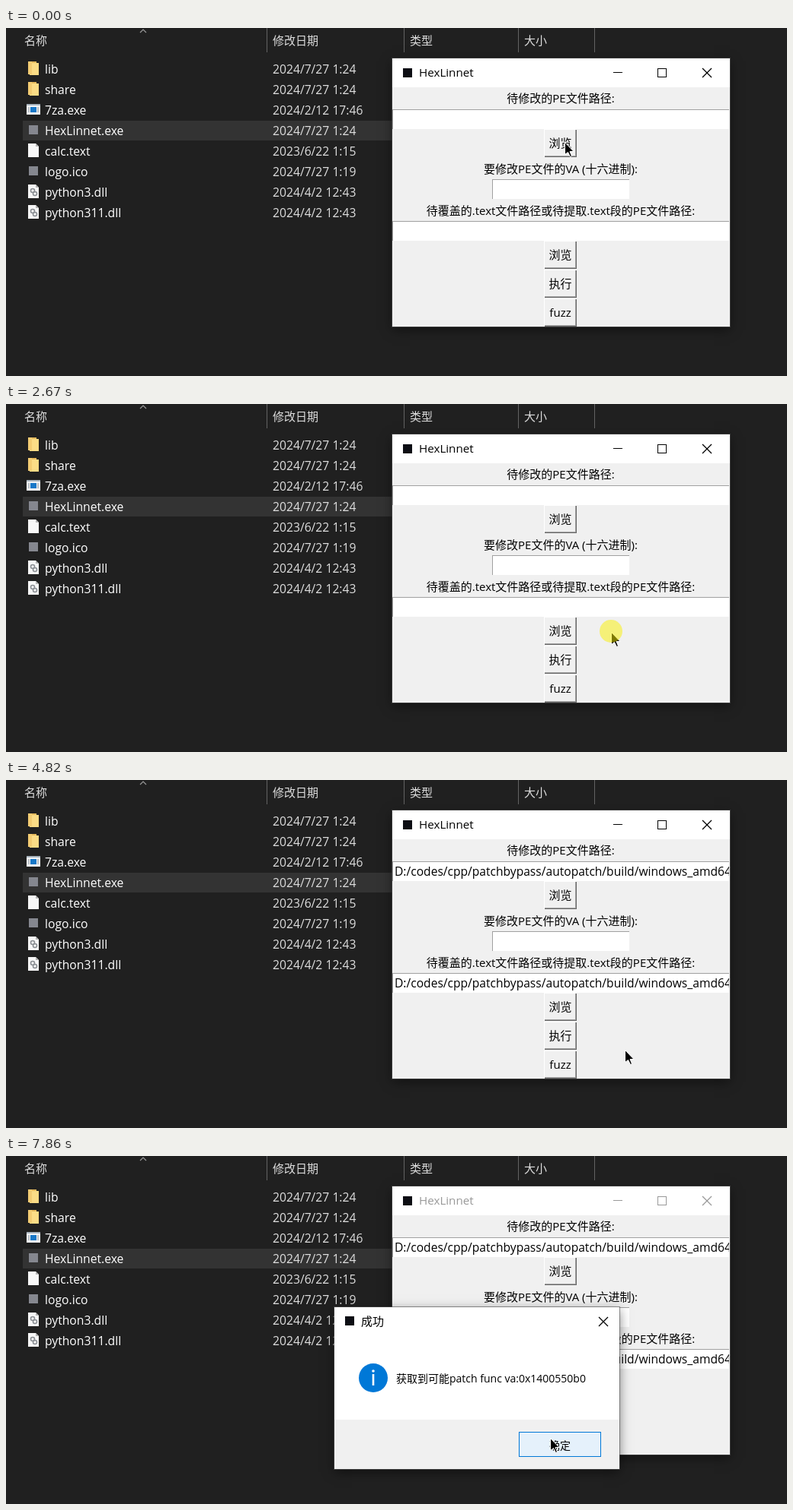
These frames come from a looping animation (1025x458 px, 8000 ms). An HTML page with a canvas:

```html
<!DOCTYPE html>
<html lang="zh-CN">
<head>
<meta charset="utf-8">
<title>HexLinnet</title>
<style>
html, body { margin: 0; width: 100%; height: 100%; overflow: hidden; background: #202020; }
canvas { display: block; }
</style>
</head>
<body>
<canvas id="stage" width="1025" height="458"></canvas>
<script>
const ctx = document.getElementById('stage').getContext('2d');
const LOOP = 8000, APP = 'HexLinnet';
const PATH = 'D:/codes/cpp/patchbypass/autopatch/build/windows_amd64/' + APP + '.exe';
const FILES = [
  ['lib', '2024/7/27 1:24', 'folder'],
  ['share', '2024/7/27 1:24', 'folder'],
  ['7za.exe', '2024/2/12 17:46', 'exe'],
  [APP + '.exe', '2024/7/27 1:24', 'logo'],
  ['calc.text', '2023/6/22 1:15', 'page'],
  ['logo.ico', '2024/7/27 1:19', 'logo'],
  ['python3.dll', '2024/4/2 12:43', 'dll'],
  ['python311.dll', '2024/4/2 12:43', 'dll'],
];
const PLACES = ['此电脑', '3D 对象', '视频', '图片', '文档', '下载', '音乐', '桌面', '本地磁盘 (C:)'];

// Pointer path: time, x, y
const POINTER = [
  [0, 733, 150], [70, 733, 150], [480, 722, 151], [670, 721, 151], [800, 712, 140], [1059, 712, 140],
  [1060, 721, 152], [1590, 721, 152], [2000, 790, 286], [2270, 794, 300], [2740, 794, 300],
  [3210, 729, 297], [3889, 729, 297], [3890, 819, 362], [3950, 819, 362], [4090, 821, 357], [4750, 821, 357],
  [5130, 727, 336], [5840, 727, 336], [6050, 706, 373], [7119, 706, 373], [7120, 717, 375],
  [7580, 717, 375], [7800, 714, 371], [8000, 714, 371],
];
const CLICKS = [[530, 680], [2470, 2540], [2600, 2740], [3280, 3420], [4350, 4490], [5120, 5260], [6190, 6330]];

const within = (t, a, b) => t >= a && t < b;
const fade = (t, on, off) => Math.max(0, Math.min(1, (t - on) / 60, (off - t) / 100));

function rect(x, y, w, h, color) {
  ctx.fillStyle = color;
  ctx.fillRect(x, y, w, h);
}

function text(str, x, y, color = '#fff', size = 15, align = 'left') {
  ctx.font = `${size}px "Open Sans", "Noto Sans CJK SC", "Noto Sans CJK", sans-serif`;
  ctx.textAlign = align;
  ctx.fillStyle = color;
  ctx.fillText(str, x, y + 5.5);
}

function line(color, width, ...points) {
  ctx.strokeStyle = color;
  ctx.lineWidth = width;
  ctx.beginPath();
  for (let i = 0; i < points.length; i += 2) ctx.lineTo(points[i], points[i + 1]);
  ctx.stroke();
}

function shape(color, ...points) {
  ctx.fillStyle = color;
  ctx.beginPath();
  for (let i = 0; i < points.length; i += 2) ctx.lineTo(points[i], points[i + 1]);
  ctx.fill();
}

function disc(x, y, r, color) {
  ctx.fillStyle = color;
  ctx.beginPath();
  ctx.arc(x, y, r, 0, 7);
  ctx.fill();
}

function frame(x, y, w, h, color, width = 1) {
  ctx.strokeStyle = color;
  ctx.lineWidth = width;
  ctx.strokeRect(x + width / 2, y + width / 2, w - width, h - width);
}

// Window background with its shadow and a translucent outer border
function panel(x, y, w, h, color) {
  ctx.save();
  ctx.shadowColor = 'rgba(0,0,0,.5)';
  ctx.shadowBlur = 14;
  ctx.shadowOffsetY = 4;
  rect(x, y, w, h, color);
  ctx.restore();
  frame(x - 1, y - 1, w + 2, h + 2, 'rgba(80,80,80,.6)');
}

const up = (x, y, color) => line(color, 1.2, x - 4, y + 2, x, y - 2, x + 4, y + 2);
const chevron = (x, y) => line('#aaa', 1.5, x - 2, y - 4, x + 2, y, x - 2, y + 4);

function cross(x, y, color) {
  line(color, 1.2, x - 6, y - 6, x + 6, y + 6);
  line(color, 1.2, x - 6, y + 6, x + 6, y - 6);
}

// All icons are centred on x, y
const icons = {
  folder(x, y) {
    rect(x - 7, y - 9, 11, 17, '#e5b95c');
    rect(x - 5, y - 7, 12, 16, '#fbdc86');
    rect(x - 7, y - 9, 5, 17, '#f3cc73');
  },
  page(x, y) {
    shape('#f7f7f7', x - 7, y - 9, x + 3, y - 9, x + 7, y - 5, x + 7, y + 9, x - 7, y + 9);
    shape('#b5b5b5', x + 3, y - 9, x + 7, y - 5, x + 3, y - 5);
  },
  dll(x, y) {
    icons.page(x, y);
    for (const [dx, dy] of [[-1, -1], [2, 3]]) {
      ctx.strokeStyle = '#8b8f94';
      ctx.lineWidth = 1.6;
      ctx.beginPath();
      ctx.arc(x + dx, y + dy, 2.5, 0, 7);
      ctx.stroke();
    }
  },
  exe(x, y) {
    rect(x - 9, y - 7, 18, 14, '#f2f4f6');
    rect(x - 9, y - 7, 18, 2, '#a9b4be');
    rect(x - 4, y - 3, 8, 7, '#1878c8');
    for (const dx of [-7, 5]) rect(x + dx, y - 3, 2, 7, '#b9c1c8');
  },
  logo(x, y, color = '#85878f') { rect(x - 6, y - 6, 12, 12, color); },
};

const placeIcons = [
  (x, y) => { rect(x - 10, y - 8, 20, 13, '#2f9de6'); rect(x - 5, y + 6, 10, 2, '#9cc8e8'); },
  (x, y) => {
    shape('#62c8f2', x, y - 10, x + 9, y - 6, x, y - 2, x - 9, y - 6);
    shape('#d6effa', x - 9, y - 6, x, y - 2, x, y + 9, x - 9, y + 5);
    shape('#2597d8', x + 9, y - 6, x, y - 2, x, y + 9, x + 9, y + 5);
  },
  (x, y) => {
    rect(x - 8, y - 9, 16, 18, '#666');
    rect(x - 4, y - 8, 8, 7, '#3d8bd0');
    rect(x - 4, y + 1, 8, 7, '#d6a046');
    for (let i = -7; i < 9; i += 4) { rect(x - 7, y + i, 2, 2, '#ddd'); rect(x + 5, y + i, 2, 2, '#ddd'); }
  },
  (x, y) => {
    rect(x - 10, y - 7, 20, 15, '#eee');
    rect(x - 8, y - 5, 16, 11, '#7dbce6');
    shape('#4b8a78', x - 8, y + 6, x - 2, y, x + 3, y + 3, x + 8, y + 1, x + 8, y + 6);
  },
  (x, y) => { icons.page(x, y); for (let i = -4; i < 7; i += 3) rect(x - 4, y + i, 8, 1.5, '#2d8ccb'); },
  (x, y) => shape('#2f9cec', x - 3, y - 9, x + 3, y - 9, x + 3, y, x + 9, y, x, y + 10, x - 9, y, x - 3, y),
  (x, y) => { disc(x - 3, y + 5, 4, '#35a3f0'); line('#35a3f0', 2.5, x, y + 5, x, y - 9, x + 6, y - 3, x + 5, y + 2); },
  (x, y) => { rect(x - 10, y - 7, 20, 15, '#1f8fe0'); rect(x - 10, y + 5, 20, 3, '#63bdf5'); },
  (x, y) => { rect(x - 10, y - 1, 20, 7, '#aaa'); rect(x - 8, y - 7, 6, 5, '#2f9de6'); },
];

function explorer() {
  rect(0, 0, 1025, 458, '#202020');
  ['名称', '修改日期', '类型', '大小'].forEach((s, i) => text(s, [24, 350, 530, 680][i], 16, '#dedede'));
  for (const x of [342, 522, 672, 772]) rect(x, 0, 1, 32, '#636363');
  up(180, 4, '#999');
  rect(22, 122, 750, 26, '#333');
  FILES.forEach(([name, date, icon], i) => {
    const y = 54 + 27 * i;
    icons[icon](36, y - 1);
    text(name, 51, y, '#fff', 15.7);
    text(date, 350, y, '#dedede', 15.7);
  });
}

function entry(x, y, w, value) {
  rect(x, y, w, 26, '#fff');
  rect(x, y, w, 1, '#a0a0a0');
  rect(x, y, 1, 26, '#a0a0a0');
  if (!value) return;
  ctx.save();
  ctx.beginPath();
  ctx.rect(x, y, w, 26);
  ctx.clip();
  text(value, x + 3, y + 13, '#000', 15.6);
  ctx.restore();
}

function button(label, y, pressed) {
  rect(706, y, 43, 37, pressed ? '#696969' : '#fff');
  rect(707, y + 1, 42, 36, pressed ? '#fff' : '#696969');
  rect(707, y + 1, 41, 35, '#a0a0a0');
  rect(707, y + 1, 40, 34, '#f0f0f0');
  text(label, 727.5 + pressed, y + 18 + pressed, '#000', 15, 'center');
}

function appWindow(t) {
  const active = t < 600 || within(t, 2540, 3350) || within(t, 4420, 5260) || within(t, 6390, 7320);
  const ink = active ? '#000' : '#999';
  panel(507, 40, 443, 353, '#f0f0f0');
  rect(507, 40, 443, 38, '#fff');
  icons.logo(527, 59, '#0d0e14');
  text(APP, 542, 58, ink, 15.2);
  rect(797, 58, 12, 1, ink);
  frame(855, 53, 12, 12, ink);
  cross(920, 59, ink);
  text('待修改的PE文件路径:', 728, 92, '#000', 15, 'center');
  entry(507, 107, 442, t >= 2740 && PATH);
  text('要修改PE文件的VA (十六进制):', 728, 185, '#000', 15, 'center');
  entry(638, 199, 180);
  text('待覆盖的.text文件路径或待提取.text段的PE文件路径:', 728, 240, '#000', 15, 'center');
  entry(507, 254, 442, t >= 4560 && PATH.replace(APP + '.exe', 'calc.text'));
  button('浏览', 133, within(t, ...CLICKS[0]));
  button('浏览', 280, within(t, ...CLICKS[3]));
  button('执行', 318, within(t, ...CLICKS[5]));
  button('fuzz', 356, false);
}

function addressBar() {
  rect(517, 112, 508, 44, '#191919');
  line('#999', 2, 548, 133, 534, 133);
  line('#999', 2, 540, 127, 534, 133, 540, 139);
  line('#888', 2, 584, 133, 598, 133);
  line('#888', 2, 592, 127, 598, 133, 592, 139);
  line('#888', 1.5, 604, 131, 607, 134, 610, 131);
  line('#fff', 2, 633, 141, 633, 127);
  line('#fff', 2, 627, 133, 633, 127, 639, 133);
  frame(650, 118, 400, 29, '#535353');
  icons.folder(663, 132);
  text('«', 681, 130, '#ccc', 17);
  [['autopatch', 702, 790], ['build', 806, 857], ['windows_amd64', 873, 1008]].forEach(([s, x, end]) => {
    text(s, x, 132, '#fff', 15.3);
    chevron(end, 132);
  });
  text('组织', 540, 175);
  shape('#ddd', 576, 172, 586, 172, 581, 178);
  text('新建文件夹', 624, 175);
}

// stage: 0 empty, 1 list with plain icons, 2 complete
function fileDialog(title, alpha, stage, files, pointerY) {
  if (!alpha) return;
  ctx.save();
  ctx.globalAlpha = alpha;
  panel(517, 73, 540, 400, '#202020');
  rect(517, 73, 508, 39, '#000');
  icons.logo(537, 92, '#55575f');
  text(title, 552, 92);
  rect(517, 112, 508, 44, '#fff');
  if (stage === 2) addressBar();
  if (stage) {
    const shift = stage === 2 ? 1.3 : 0;
    rect(517, 194, 508, 1, '#151515');
    rect(517, 195, 198, 263, '#191919');
    rect(692, 195, 19, 263, '#171717');
    rect(692, 354 + shift * 4.5, 19, 110, '#4d4d4d');
    up(701, 206, '#999');
    PLACES.forEach((place, i) => {
      const y = 219 + 29.9 * i + shift;
      if (stage === 2) placeIcons[i](i ? 567 : 557, y);
      else if (i) icons.page(567, y);
      text(place, i ? 583 : 573, y, '#eee');
    });
    text('名称', 738, 211 + shift, '#ddd');
    up(894, 198, '#999');
    const hover = stage === 2 ? Math.round((pointerY - 250) / 26.3) : 0;
    files.forEach(([name, , icon], i) => {
      const y = 249 + 26.3 * i + shift;
      if (i === hover) rect(735, Math.round(y - 13), 290, 27, '#4d4d4d');
      icons[stage === 2 || icon === 'folder' ? icon : 'page'](750, y - 1);
      text(name, 765, y, '#eee', 15.4);
    });
  }
  ctx.restore();
}

function messageBox(x, w, title, message, alpha, hover) {
  if (!alpha) return;
  const scale = .9 + .1 * alpha, cx = x + w / 2, right = x + w;
  ctx.save();
  ctx.globalAlpha = alpha;
  ctx.translate(cx, 305);
  ctx.scale(scale, scale);
  ctx.translate(-cx, -305);
  panel(x, 199, w, 213, '#fff');
  rect(x, 347, w, 65, '#f0f0f0');
  icons.logo(x + 20, 217, '#0d0e14');
  text(title, x + 35, 217, '#000');
  cross(right - 21, 218, '#000');
  disc(x + 51, 292, 19, '#0078d7');
  disc(x + 51, 283, 1.8, '#fff');
  rect(x + 49.7, 287, 2.6, 15, '#fff');
  text(message, x + 81, 292, '#000', 14);
  rect(right - 132, 363, 108, 33, hover ? '#e5f1fb' : '#e1e4e8');
  frame(right - 132, 363, 108, 33, '#0078d7', hover ? 1 : 2);
  text('确定', right - 78, 380, '#000', 14, 'center');
  ctx.restore();
}

function pointerAt(t) {
  const i = Math.max(1, POINTER.findIndex(k => k[0] > t));
  const [t0, x0, y0] = POINTER[i - 1], [t1, x1, y1] = POINTER[i];
  const k = (t - t0) / (t1 - t0), e = k * k * (3 - 2 * k);
  return [Math.round(x0 + (x1 - x0) * e), Math.round(y0 + (y1 - y0) * e)];
}

function pointer(x, y, clicked) {
  const outline = [0, 0, 0, 16, 4, 13, 7, 19, 9, 18, 6.5, 12, 11.5, 12, 0, 0];
  const points = outline.map((v, i) => v + (i % 2 ? y : x) + .5);
  shape('#000', ...points);
  line('#fff', 1, ...points);
  if (clicked) disc(x, y - 1, 15, 'rgba(250,240,0,.5)');
}

function draw(now) {
  const t = now % LOOP;
  const [x, y] = pointerAt(t);
  explorer();
  appWindow(t);
  fileDialog('选择待修改的PE文件', fade(t, 1360, 2570), t < 1590 ? 0 : t < 2060 ? 1 : 2, FILES.slice(0, 4), y);
  fileDialog('选择待覆盖的.text文件或待提取的PE文件', fade(t, 3870, 4450), 2, FILES, y);
  messageBox(448, 339, 'VA为空', '未检测到VA输入,启动自动化patch', fade(t, 5350, 6400), false);
  messageBox(431, 374, '成功', '获取到可能patch func va:0x1400550b0', fade(t, 7400, 9000), t > 7700);
  pointer(x, y, CLICKS.some(c => within(t, ...c)));
}

const start = performance.now();
function tick() {
  draw(performance.now() - start);
  requestAnimationFrame(tick);
}
tick();
</script>
</body>
</html>
```
